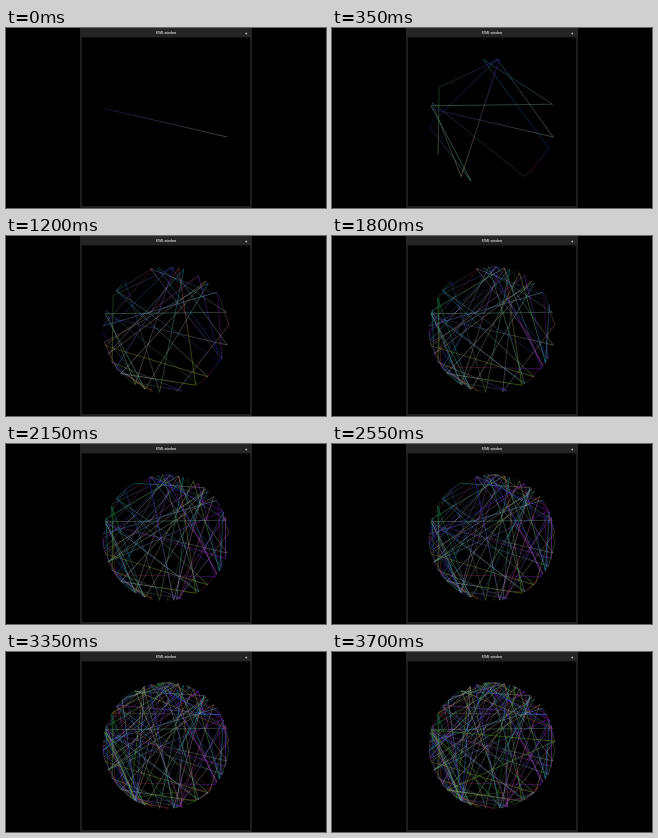
Animation of 320 by 180 pixels, one loop 3750 ms. Source, as an HTML page with a canvas:

```html
<!DOCTYPE html>
<html lang="en">
<head>
<meta charset="utf-8">
<title>SFML window</title>
<style>
  html, body { margin: 0; width: 100%; height: 100%; overflow: hidden; background: #000; }
  canvas { display: block; width: 320px; height: 180px; }
</style>
</head>
<body>
<canvas id="stage" width="320" height="180"></canvas>
<script>
const ctx = document.getElementById('stage').getContext('2d');
const LOOP = 3750, STEP = 50, PER_STEP = 2;
const CENTER = { x: 160, y: 93.7 }, RADIUS = 63;

let seed = 71;
function random() {
  seed = (seed + 0x6D2B79F5) | 0;
  let t = Math.imul(seed ^ (seed >>> 15), 1 | seed);
  t = (t + Math.imul(t ^ (t >>> 7), 61 | t)) ^ t;
  return ((t ^ (t >>> 14)) >>> 0) / 4294967296;
}

function vertex(degrees, color) {
  const a = degrees * Math.PI / 180;
  return {
    x: CENTER.x + RADIUS * Math.cos(a),
    y: CENTER.y + RADIUS * Math.sin(a),
    color
  };
}

function randomVertex() {
  const channel = max => Math.floor(random() * max);
  return vertex(random() * 360, `rgb(${channel(210)}, ${channel(220)}, ${channel(256)})`);
}

// A chain of chords: each one starts where the previous one ended.
const vertices = [vertex(192, '#2828a0'), vertex(14, '#a8a890')];
while (vertices.length <= LOOP / STEP * PER_STEP) vertices.push(randomVertex());

const chords = vertices.slice(1).map((b, i) => {
  const a = vertices[i];
  const stroke = ctx.createLinearGradient(a.x, a.y, b.x, b.y);
  stroke.addColorStop(0, a.color);
  stroke.addColorStop(1, b.color);
  return { a, b, stroke };
});

function drawWindow() {
  ctx.fillStyle = '#000';
  ctx.fillRect(0, 0, 320, 180);
  ctx.fillStyle = '#242424';
  ctx.fillRect(74.5, 0, 171, 9.5);
  ctx.strokeStyle = '#282828';
  ctx.lineWidth = 1.5;
  ctx.strokeRect(75, 0.5, 170, 178.5);
  ctx.fillStyle = '#ccc';
  ctx.font = 'bold 3px "Open Sans", sans-serif';
  ctx.textAlign = 'center';
  ctx.textBaseline = 'middle';
  ctx.fillText('SFML window', 160, 5.6);
  ctx.fillRect(239.6, 4.8, 1.5, 1.5);
}

function drawChord({ a, b, stroke }) {
  ctx.strokeStyle = stroke;
  ctx.beginPath();
  ctx.moveTo(a.x, a.y);
  ctx.lineTo(b.x, b.y);
  ctx.stroke();
}

function draw() {
  const step = Math.floor(performance.now() % LOOP / STEP);
  drawWindow();
  ctx.lineWidth = 0.4;
  chords.slice(0, step * PER_STEP + 1).forEach(drawChord);
  requestAnimationFrame(draw);
}
draw();
</script>
</body>
</html>
```
